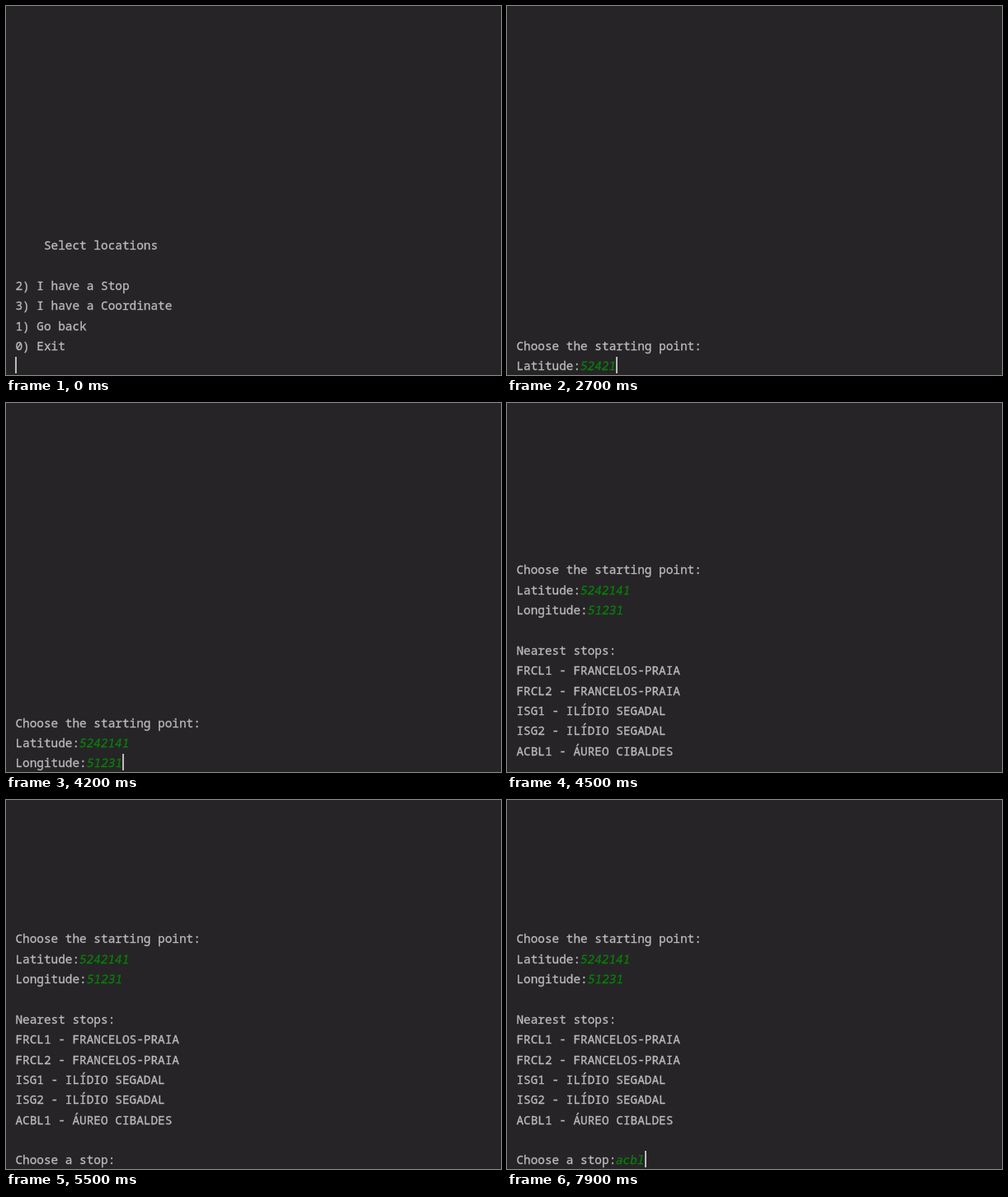
Write an HTML page that moves like this. It is 600x447 px and loops after 8 s.

```html
<!DOCTYPE html>
<html lang="en">
<head>
<meta charset="utf-8">
<title>Terminal session</title>
<style>
  html, body { margin: 0; width: 100%; height: 100%; overflow: hidden; background: #262427; }
  #stage { position: absolute; left: 0; top: 0; width: 600px; height: 447px; overflow: hidden; }
  pre {
    position: absolute; left: 11.4px; bottom: -1.6px; margin: 0;
    font: 14.4px/24.35px "Noto Sans Mono", "DejaVu Sans Mono", monospace;
    font-variant-ligatures: none; color: #bbb; -webkit-text-stroke: 0.3px;
  }
  .input { display: inline-block; color: #088008; transform: skewX(-10deg); }
  .cursor {
    display: inline-block; width: 2px; height: 20px; margin-right: -2px;
    vertical-align: -4px; background: #bbb;
  }
</style>
</head>
<body>
<div id="stage"><pre id="screen"></pre></div>
<script>
const LOOP = 8000;
const screen = document.getElementById("screen");

const menu = `    Select locations

2) I have a Stop
3) I have a Coordinate
1) Go back
0) Exit
`;
const stops = `

Nearest stops:
FRCL1 - FRANCELOS-PRAIA
FRCL2 - FRANCELOS-PRAIA
ISG1 - ILÍDIO SEGADAL
ISG2 - ILÍDIO SEGADAL
ACBL1 - ÁUREO CIBALDES

Choose a stop:`;

// Each key time reveals one more character.
const keys = {
  option: ["3", [1100]],
  lat: ["5242141", [2200, 2300, 2500, 2700, 2700, 2800, 3000]],
  lon: ["51231", [3800, 3900, 4000, 4100, 4200]],
  stop: ["acbl", [6300, 7200, 7400, 7600]]
};
const cursorOff = [[400, 900], [1900, 2200], [3700, 3800], [5500, 6000], [6900, 7200]];
const scrollSteps = [34, 16, 6, 2];

function typed(name, t) {
  const [text, times] = keys[name];
  const count = times.filter(time => time <= t).length;
  return `<span class="input">${text.slice(0, count)}</span>`;
}

function content(t) {
  if (t < 1400) return menu + typed("option", t);
  let out = "Choose the starting point:\nLatitude:" + typed("lat", t);
  if (t >= 3200) out += "\nLongitude:" + typed("lon", t);
  if (t >= 4500) out += stops + typed("stop", t);
  else if (t >= 4300) out += "\n";
  return out;
}

let last = "";
function draw(now) {
  const t = now % LOOP;
  const hidden = cursorOff.some(([from, to]) => t >= from && t < to);
  const html = content(t) +
    `<span class="cursor" style="visibility:${hidden ? "hidden" : "visible"}"></span>`;
  if (html !== last) screen.innerHTML = last = html;
  const shift = scrollSteps[Math.floor((t - 4500) / 100)] || 0;
  screen.style.transform = shift ? `translateY(${shift}px)` : "none";
  requestAnimationFrame(draw);
}
draw(performance.now());
</script>
</body>
</html>
```
